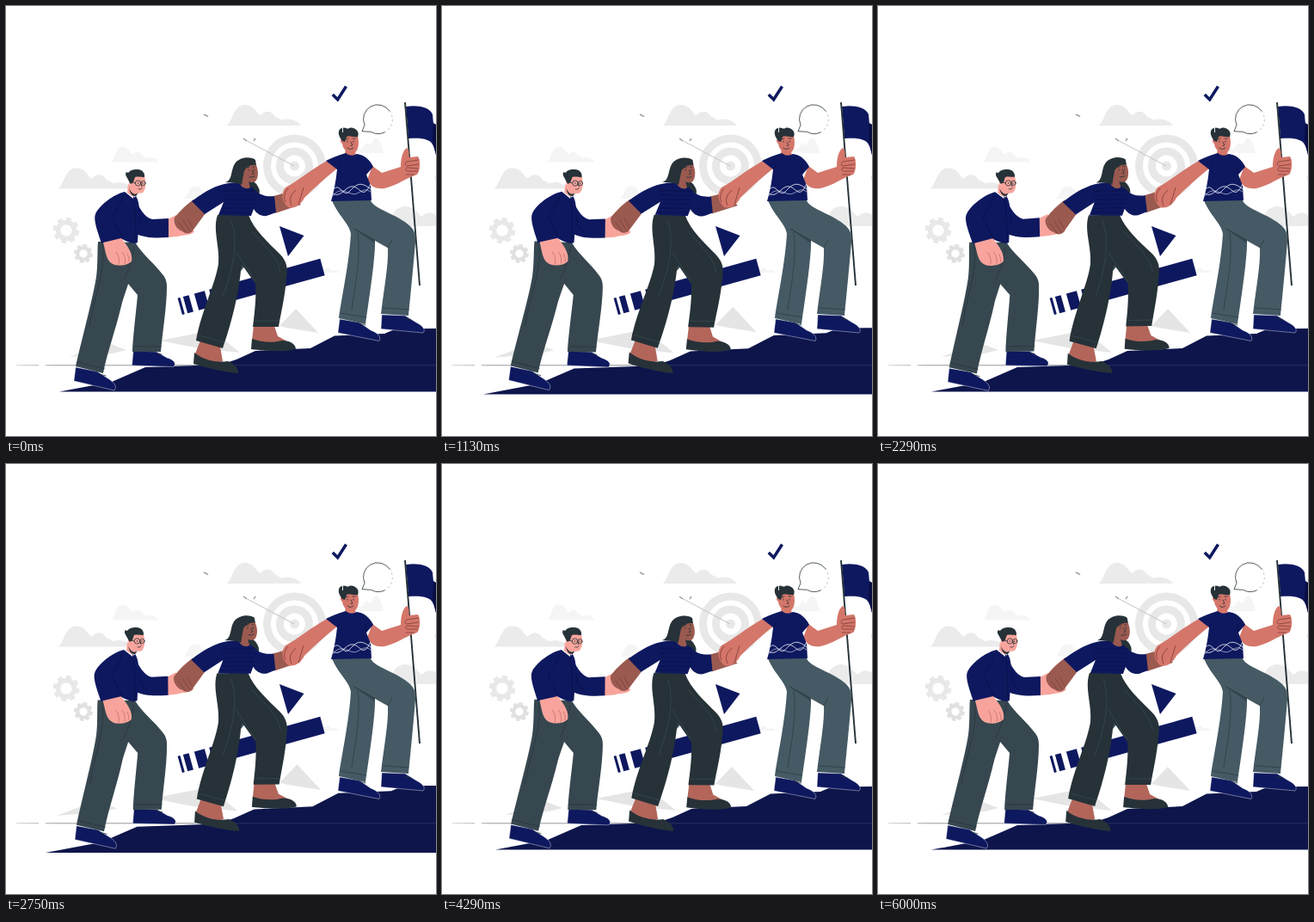
Animation of 500 by 500 pixels, one loop 6.04 s. Source, as an HTML page:

```html
<!DOCTYPE html>
<html lang="en">
<head>
<meta charset="utf-8">
<title>Climbing together</title>
<style>
html, body { margin: 0; width: 100%; height: 100%; overflow: hidden; background: #fff; }
svg { display: block; width: 100vw; height: 100vh; }
.navy { fill: #0e185f; }
.dark { fill: #263238; }
.slate { fill: #37474f; }
.steel { fill: #455a64; }
.pink { fill: #f8a49c; }
.brown { fill: #9b5a50; }
.tan { fill: #d4766a; }
.grey { fill: #ebebeb; }
.pale { fill: #f5f5f5; }
.rock { fill: #e5e5e5; }
.ring { fill: none; stroke: #e8e8e8; }
.ink { fill: none; stroke: #263238; stroke-width: .8; stroke-linecap: round; }
.seam { fill: none; stroke: #1f2a30; stroke-width: .6; opacity: .8; }
.fold { fill: none; stroke: #070d40; stroke-width: .6; }
.shoe { fill: #0e185f; stroke: #fff; stroke-width: .4; }
</style>
</head>
<body>
<svg viewBox="0 0 500 500">
  <defs>
    <path id="cloud" d="M0 25C7 23 8 1 21 1C34 1 35 12 40 13C45 7 53 7 57 15C61 15 62 20 68 18C77 16 84 21 87 25Z"/>
    <linearGradient id="fade" gradientUnits="userSpaceOnUse" x1="12" x2="60" y1="0" y2="0">
      <stop stop-color="#d4d4d4"/><stop offset="1" stop-color="#94989d"/>
    </linearGradient>
  </defs>

  <!-- sky -->
  <use href="#cloud" class="grey" x="256" y="114"/>
  <use href="#cloud" class="grey" x="60" y="187.500"/>
  <use href="#cloud" class="pale" transform="translate(122 163) scale(.64 .74)"/>
  <use href="#cloud" class="grey" transform="translate(440 232) scale(1.1 .96)"/>
  <use href="#cloud" class="pale" transform="translate(440 153) scale(-.42 .72)"/>
  <use href="#cloud" class="pale" transform="translate(207 209) scale(.6)"/>
  <use href="#cloud" class="pale" transform="translate(357 301) scale(.36)"/>
  <circle class="grey" cx="503.500" cy="200" r="5"/>

  <g class="ring">
    <circle cx="335.500" cy="186" r="32" stroke-width="9"/>
    <circle cx="335.500" cy="186" r="17" stroke-width="9"/>
    <circle cx="335.500" cy="186" r="5.500" fill="#e8e8e8" stroke="none"/>
    <path d="M277 155L335 186" stroke="#c4c4c4" stroke-width="1"/>
    <path d="M276 154l4 3M288 157l2-3M230 126l5 2.500" stroke="#a2a2a2" stroke-width="1.500"/>
  </g>

  <g class="ring">
    <circle cx="70" cy="261" r="9.500" stroke-width="5.500"/>
    <circle cx="70" cy="261" r="13" pathLength="80" stroke-width="4.500" stroke-dasharray="5.600 4.400"/>
    <g stroke="#e0e0e0">
      <circle cx="90" cy="288" r="6.800" stroke-width="4.200"/>
      <circle cx="90" cy="288" r="9.300" pathLength="80" stroke-width="3.400" stroke-dasharray="5.600 4.400"/>
    </g>
  </g>

  <path d="M379.800 103L385.700 108.700L395.500 93.500" fill="none" stroke="#0e185f" stroke-width="3.500"/>
  <path class="ink" d="M446 122A16.700 16.700 0 0 0 417 138.300L414 145.700L424.500 146.300A16.700 16.700 0 0 0 440 147"/>
  <path class="ink" d="M446 122A16.700 16.700 0 0 1 440 147" stroke-dasharray="1.500 4" opacity=".4"/>

  <!-- hill -->
  <path d="M12 417.800H38M46 417.800H500" stroke="url(#fade)"/>
  <g id="hill">
    <path class="rock" d="M74 408L118 391.500L140 400L124 404ZM179 389L240 377L272 403L224 398ZM318 372L337 352L363 380L326 374Z"/>
    <path fill="#0d154b" d="M62 448.600L123 437L162 420L250 417L268 411L290 401L354 398L382 383.500L440 381L453 375.500L620 374V448.600Z"/>
  </g>
  <path d="M160 417.800H500" stroke="#8d9196" stroke-width=".8" opacity=".28"/>

  <!-- arrow -->
  <g class="navy">
    <path transform="translate(368 303.500) rotate(-15.500)" d="M-134-10H0V10H-134ZM-152-10h12.500v20h-12.500ZM-165.500-10h7v20h-7ZM-172-10h3v20h-3Z"/>
    <path d="M318 256L346.500 267L328 291Z"/>
  </g>

  <!-- first climber -->
  <g class="climber" data-pivot="149 318">
    <path class="shoe" d="M148 401L146.500 418L195 419.500C199 415 194 411 187 409L175 402Z"/>
    <path class="shoe" d="M81 420L79 436L126 447C129 443 127 439 120 434L106 425Z"/>
    <path class="ink" d="M175 404l6 1M109 428l7 2"/>
    <path class="slate" d="M138 276L151 276C158 288 172 299 182 312C186 317 187 321 187 326C187 350 182 378 180 402L147 402C148 380 152 350 153 336L137 317Z"/>
    <path class="slate" d="M107 274L150 275C154 295 140 328 135 345C128 375 118 402 113 427L81 419C90 380 101 340 105 315C107 300 106 285 107 274Z"/>
    <path class="seam" d="M82 414L115 422M149 396L181 396M137 318C143 306 147 295 149 280M112 277C117 305 103 335 97 372"/>
    <path class="pink" d="M188 248L198 243L211 257L219 262C216 267 206 266 200 268L188 269Z"/>
    <path class="navy" d="M148 220C155 235 161 246 170 248L189 247L189 269C175 270 160 270 150 264Z"/>
    <path class="pink" d="M142 207L156 212L152 220C148 224 144 219 141 217Z"/>
    <path class="navy" d="M138 216C125 219 108 232 104 242C101 249 108 266 111 276L135 271Q148 278 153 275L155 240C155 229 153 224 151 221L148 224Z"/>
    <path class="fold" d="M136 221C132 235 126 240 123 246L135 269M148 224C152 240 150 258 151 275M155 243Q156 258 165 263"/>
    <path class="pink" d="M113 275L134 270C142 279 148 289 146 297C141 302 130 303 124 300C116 296 116 285 113 275Z"/>
    <path fill="none" stroke="#b96c68" stroke-width=".7" d="M128 286Q133 293 131 301M135 286Q140 292 138 300M141 288Q144 293 143 298"/>
    <path class="dark" d="M143 212Q148 222 154 217L151 221Q145 222 143 212Z"/>
    <path class="pink" d="M147 197L161 198C163 205 163 213 159 217C153 220 146 214 145 208C142 207 142 203 146 203Z"/>
    <path class="dark" d="M141 200C140 198 138 196 140 193L142 194C145 190 150 190 153 190C158 190 162 194 161 199C157 199 154 198 150 199L148 205L145 207C143 204 142 202 141 200Z"/>
    <g class="ink" stroke-width=".7">
      <circle cx="153.500" cy="206" r="3.200"/><circle cx="159.500" cy="206" r="2.600"/>
      <path d="M147 205L150 206M153.500 205.500v1M159 205.500v1M157 207l1 3M154 213Q156 214 158 212"/>
    </g>
  </g>

  <!-- second climber -->
  <g class="climber" data-pivot="266 302">
    <path fill="#b3655a" d="M226 389L249 396L252 413L240 416L219 407ZM288 371L312 372L316 384L327 390L310 395L286 389Z"/>
    <path class="dark" d="M219 403C230 412 245 415 258 413C266 416 271 422 270 427C255 426 230 420 218 416ZM286 387C297 391 310 392 321 389C330 389 337 393 337 399C325 403 300 401 285 399Z"/>
    <path fill="#40535c" d="M268 286L280 300L273 308Z"/>
    <path class="dark" d="M260 243H282C288 260 305 275 318 288C327 297 328 305 326 318C324 340 320 355 317 373L287 373C290 350 291 335 290 323L264 286Z"/>
    <path class="dark" d="M246 243L279 243C284 270 277 292 273 308C270 340 260 375 252 398L221 389C227 355 243 325 247 300C249 280 240 260 246 243Z"/>
    <path d="M224 383L254 391M289 366H318M262 250C271 275 263 310 252 338M286 262C300 278 317 293 319 310M268 286L290 321" fill="none" stroke="#43545c" stroke-width=".5"/>
    <path class="brown" d="M311 221L329 216L343 231L313 241ZM218 225L232 241L218 260C216 265 209 266 205 262C198 260 194 251 196 246C203 237 211 230 218 225Z"/>
    <path d="M201 252L209 263M206 249L214 262M211 247L217 258" stroke="#713e39" stroke-width=".7"/>
    <path class="dark" d="M274 199L284 202C292 206 297 214 294 219C289 213 282 210 272 209Z"/>
    <path class="navy" d="M259 206C245 208 232 215 216 227L231 242L253 228L247 243L285 244L288 236C292 243 300 246 306 243L314 240L312 221C303 222 296 220 292 216C285 208 272 204 259 206Z"/>
    <path class="fold" d="M252 215H290M252 220H291M254 225H290M253 230H289M251 235H288M249 240H286"/>
    <path class="brown" d="M273 186L290 183C294 190 294 200 290 204C287 206 284 205 282 204L284 211C280 214 274 211 272 207Z"/>
    <path class="dark" d="M255 205C264 203 261 189 267 182C273 175 286 175 290 179L291 185C285 184 279 187 277 192L275 202L274 208C268 205 262 206 255 205Z"/>
    <path class="ink" d="M282 190v1.200M288.500 190v1.200M280 188l3-1M287 187h2M286 191l2 4l-2 .5M283 199Q286 200 289 198"/>
    <path class="ink" d="M288 205C294 207 290 213 294 218"/>
  </g>

  <!-- leader -->
  <path class="navy" d="M465 117C478 115 492 117 496 126L497 137L500 138V173C498 166 497 158 490 156C483 153 475 154 468 154Z"/>
  <path fill="#080d42" d="M497 136L500 138V173L496 156Z"/>
  <path d="M464 112L481 325" stroke="#263238" stroke-width="1.900"/>
  <path class="shoe" d="M388 364L386 380L434 389.500C437 385 432 380 424 377L411 368ZM437 359L436 375.500L485 380C489 376 483 371 477 368L464 360Z"/>
  <path class="ink" d="M463 363l8 2M410 369l8 2"/>
  <path class="steel" d="M379 226L415 240L429 270C430 290 423 335 418 370L387 363C390 340 399 300 401 265C400 255 388 245 379 226Z"/>
  <path fill="#34464f" d="M403 258L429 276L427 268Z"/>
  <path class="steel" d="M379 226H424C427 236 455 242 470 256C476 262 476 267 476 274C474 300 470 340 468 360L436 358C440 325 445 300 444 281L405 259C394 251 385 240 379 226Z"/>
  <path class="seam" d="M389 357L419 362M438 351L469 353M405 259L444 281L449 272M409 263C413 290 406 325 402 353"/>
  <path class="tan" d="M373 180C355 190 340 203 325 211C319 218 321 228 328 234C336 236 342 232 347 223C358 212 371 200 385 189Z"/>
  <path class="tan" d="M426 186L437 194L459 187C459 178 461 168 466 165C470 168 468 173 469 176L479 175C482 178 482 192 478 196L470 199C460 204 450 210 440 212C432 213 424 211 420 202Z"/>
  <path fill="none" stroke="#7d3d39" stroke-width=".8" d="M480 179L466 181Q462 184 466 186L480 184M480 189L466 188Q463 191 467 192L479 192M475 196L465 196M328 212Q321 220 325 228M337 214Q327 223 332 232M346 211L340 231"/>
  <path class="tan" d="M395 164L406 169L407 175C402 178 397 175 394 173Z"/>
  <path class="navy" d="M395 171C385 174 378 177 372 180L385 190Q383 210 378 227L425 226L424 209L419 196L427 187C424 180 417 173 408 172Q401 176 395 171Z"/>
  <path class="fold" d="M385 190L390 183M419 196L417 186"/>
  <g fill="none" stroke="#e3e5f2" stroke-width=".9">
    <path d="M381 213C388 205 392 223 399 216S411 202 424 213"/>
    <path d="M380 218C390 224 395 208 404 210S415 225 424 207"/>
    <path d="M380 221C390 207 400 222 408 218S418 212 424 216" stroke-width=".6"/>
  </g>
  <path class="tan" d="M391 151L409 151C411 159 410 168 405 171C399 173 392 168 391 160C388 158 389 154 391 154Z"/>
  <path class="dark" d="M389 154C385 148 387 142 391 142C394 140 397 144 399 142C405 140 412 146 409 152C404 153 399 150 396 152L394 158L391 157Z"/>
  <path d="M391.500 142V147" stroke="#fff" stroke-width=".9"/>
  <path class="ink" d="M397 157v1.200M404 157v1.200M395 155l3-1M403 154h3M401 158l2 4l-2 .4M397 165Q400 168 404 165"/>
</svg>
<script>
const LOOP = 6040, SWAY = LOOP / 2;
const swell = [[0, 0], [630, 1], [1800, 0], [2300, 0], [3010, 1], [3600, 0], [LOOP, 0]];
const hill = document.getElementById('hill');
const climbers = document.querySelectorAll('.climber');

// Cosine easing between key points.
function valueAt(keys, t) {
  const i = keys.findIndex(([time]) => time > t);
  const [t0, a] = keys[i - 1], [t1, b] = keys[i];
  return a + (b - a) * (1 - Math.cos(Math.PI * (t - t0) / (t1 - t0))) / 2;
}

function draw(now) {
  const t = Math.max(0, now) % LOOP;
  const scale = 1 + 0.09 * valueAt(swell, t);
  hill.setAttribute('transform', `translate(314 394) scale(${scale}) translate(-314 -394)`);
  const angle = Math.sin(2 * Math.PI * t / SWAY);
  for (const c of climbers) c.setAttribute('transform', `rotate(${angle} ${c.dataset.pivot})`);
  requestAnimationFrame(() => draw(performance.now() - start));
}

const start = performance.now();
draw(0);
</script>
</body>
</html>
```
